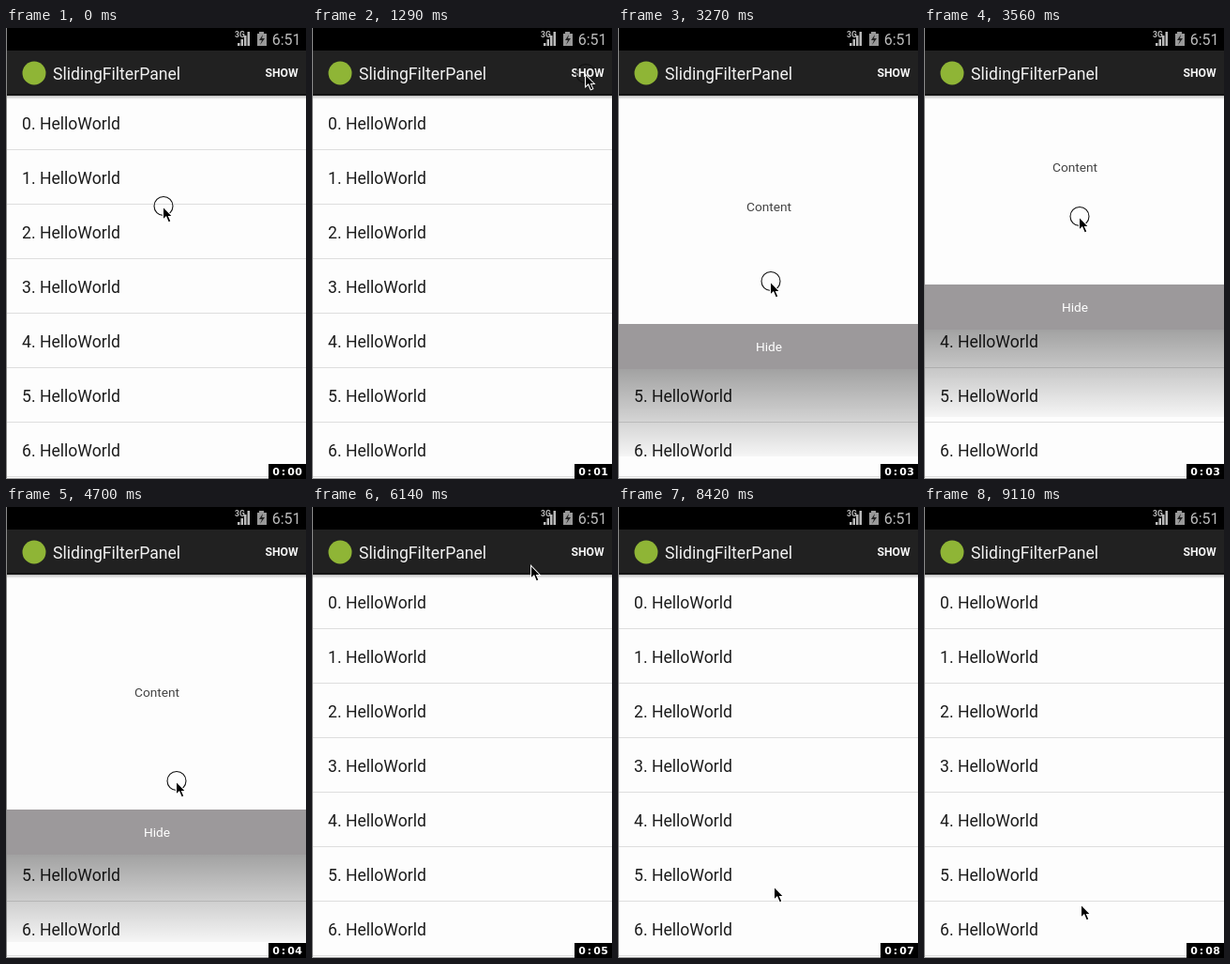
Write an HTML page with a canvas that moves like this. It is 320x480 px and loops after 9.41 s.

```html
<!DOCTYPE html>
<html lang="en">
<meta charset="utf-8">
<title>SlidingFilterPanel</title>
<style>
  html, body { margin: 0; width: 100%; height: 100%; overflow: hidden; background: #fff; }
  canvas { display: block; width: 320px; height: 480px; }
</style>
<canvas id="stage" width="320" height="480"></canvas>
<script>
const ctx = document.getElementById('stage').getContext('2d');
const LOOP = 9410, TICK = 142.6;
const TOP = 72, CONTENT = 250, BAR = 48, SHADOW = 93;
const TRAVEL = CONTENT + BAR + SHADOW, SLIDE = 3;

// Pointer stops: tick, position, ticks the button stays down
const stops = [
  { at: 0, x: 168, y: 190, down: 1 },
  { at: 9, x: 292, y: 49, down: 1 },
  { at: 11, x: 292, y: 49 },
  { at: 16, x: 161, y: 330 },
  { at: 21, x: 160, y: 339, down: 7 },
  { at: 26, x: 168, y: 167 },
  { at: 32, x: 182, y: 317, down: 4 },
  { at: 36, x: 182, y: 217 },
  { at: 43, x: 234, y: 62 },
  { at: 48, x: 292, y: 49, down: 1 },
  { at: 51, x: 216, y: 296 },
  { at: 53, x: 165, y: 345, down: 1 },
  { at: 61, x: 168, y: 423 }
];
const visits = [{ open: 9, close: 33 }, { open: 49, close: 53 }];
const drag = { from: 22, to: 33, reach: 85 };

const clamp = v => Math.min(1, Math.max(0, v));

function pointerAt(tick) {
  const i = stops.findLastIndex(s => s.at <= tick);
  const a = stops[i], b = stops[i + 1] || { ...a, at: LOOP };
  const p = (tick - a.at) / (b.at - a.at);
  return {
    x: Math.round(a.x + (b.x - a.x) * p),
    y: Math.round(a.y + (b.y - a.y) * p),
    down: stops.some(s => tick >= s.at && tick < s.at + (s.down || 0))
  };
}

// Opening slows down, closing speeds up, the drag goes up and springs back
function panelOffset(tick) {
  const slid = from => clamp((tick - from) / SLIDE);
  let shown = 0;
  for (const { open, close } of visits)
    shown += 1 - (1 - slid(open)) ** 2.7 - slid(close) ** 1.5;
  const pull = clamp((tick - drag.from) / (drag.to - drag.from));
  return Math.round((shown - 1) * TRAVEL - drag.reach * Math.sin(Math.PI * pull) ** 2);
}

function rect(color, x, y, w, h) {
  ctx.fillStyle = color;
  ctx.fillRect(x, y, w, h);
}

function text(str, x, y, font, color, align = 'left') {
  ctx.font = font;
  ctx.fillStyle = color;
  ctx.textAlign = align;
  ctx.fillText(str, x, y);
}

function shape(color, points) {
  ctx.beginPath();
  points.forEach(([x, y]) => ctx.lineTo(x, y));
  ctx.closePath();
  ctx.fillStyle = color;
  ctx.fill();
}

function fade(y, h, from, to) {
  const g = ctx.createLinearGradient(0, y, 0, y + h);
  g.addColorStop(0, `rgba(0,0,0,${from})`);
  g.addColorStop(1, `rgba(0,0,0,${to})`);
  rect(g, 0, y, 320, h);
}

function drawList() {
  rect('#fdfdfd', 0, TOP, 320, 408);
  for (let i = 0; i < 7; i++) {
    const y = TOP + i * 58;
    text(`${i}. HelloWorld`, 17, y + 36, '17.6px Roboto, sans-serif', '#1c1c1c');
    rect('#dedede', 0, y + 57, 320, 1);
  }
}

function drawPanel(offset) {
  const y = TOP + offset, bar = y + CONTENT;
  const font = '13.7px Roboto, sans-serif';
  ctx.save();
  ctx.beginPath();
  ctx.rect(0, TOP, 320, 408);
  ctx.clip();
  rect('#fdfdfd', 0, y, 320, CONTENT);
  text('Content', 161, y + 130, font, '#444', 'center');
  rect('#9c999b', 0, bar, 320, BAR);
  text('Hide', 161, bar + 29, font, '#fff', 'center');
  fade(bar + BAR, SHADOW, 0.36, 0.03);
  ctx.restore();
}

function drawStatus() {
  const grey = '#bcbcbc';
  rect('#000', 0, 0, 320, 24);
  text('3G', 244, 10, 'bold 8.5px Roboto, sans-serif', grey);
  for (let i = 0; i < 4; i++) {
    const h = 3 + i * 4;
    rect(grey, 247 + i * 3.5, 19 - h, 2.5, h);
  }
  rect('#999', 270, 4, 5, 2);
  rect('#999', 268, 6, 10, 13);
  shape('#222', [[274, 7], [270, 13], [273, 13], [271, 18], [276, 11], [273, 11]]);
  text('6:51', 314.5, 17.5, '16px Roboto, sans-serif', grey, 'right');
}

function drawActionBar() {
  rect('#212121', 0, 24, 320, 48);
  rect('#151515', 0, 70, 320, 2);
  fade(TOP, 4, 0.25, 0);
  ctx.beginPath();
  ctx.arc(30, 48, 12.5, 0, 7);
  ctx.fillStyle = '#8fb536';
  ctx.fill();
  text('SlidingFilterPanel', 50, 55, '17.6px Roboto, sans-serif', '#f2f2f2');
  text('SHOW', 294, 52, 'bold 12.2px Roboto, sans-serif', '#f5f5f5', 'center');
}

function drawBorder() {
  rect('#8a8a8a', 0, 0, 1, 480);
  rect('#a0a0a0', 0, 479, 320, 1);
}

function drawPointer({ x, y, down }) {
  if (down) {
    ctx.beginPath();
    ctx.arc(x, y - 0.5, 10, 0, 7);
    ctx.strokeStyle = '#111';
    ctx.lineWidth = 1.1;
    ctx.stroke();
  }
  ctx.save();
  ctx.translate(x, y + 1);
  shape('#fff', [[-1, -2], [-1, 14], [2.6, 11], [5, 16.5], [8.5, 15], [6.2, 10], [10.5, 10]]);
  shape('#000', [[0, 0.5], [0, 11.8], [3, 9], [5.6, 15.2], [7.2, 14.4], [4.7, 9], [8.3, 9]]);
  ctx.restore();
}

function drawTimer(seconds) {
  rect('#000', 280, 464, 40, 16);
  [...`0:0${seconds}`].forEach((c, i) =>
    text(c, 288 + i * 8, 475.5, 'bold 11px "DejaVu Sans", sans-serif', '#fff', 'center'));
}

function draw(now) {
  const t = now % LOOP;
  const tick = Math.min(65, Math.floor((t + 20) / TICK));
  drawList();
  drawPanel(panelOffset(tick));
  drawStatus();
  drawActionBar();
  drawBorder();
  drawTimer(Math.floor(tick * TICK * 0.95 / 1000));
  drawPointer(pointerAt(tick));
}

const start = performance.now();
function loop() {
  draw(performance.now() - start);
  requestAnimationFrame(loop);
}
loop();
</script>
</html>
```
